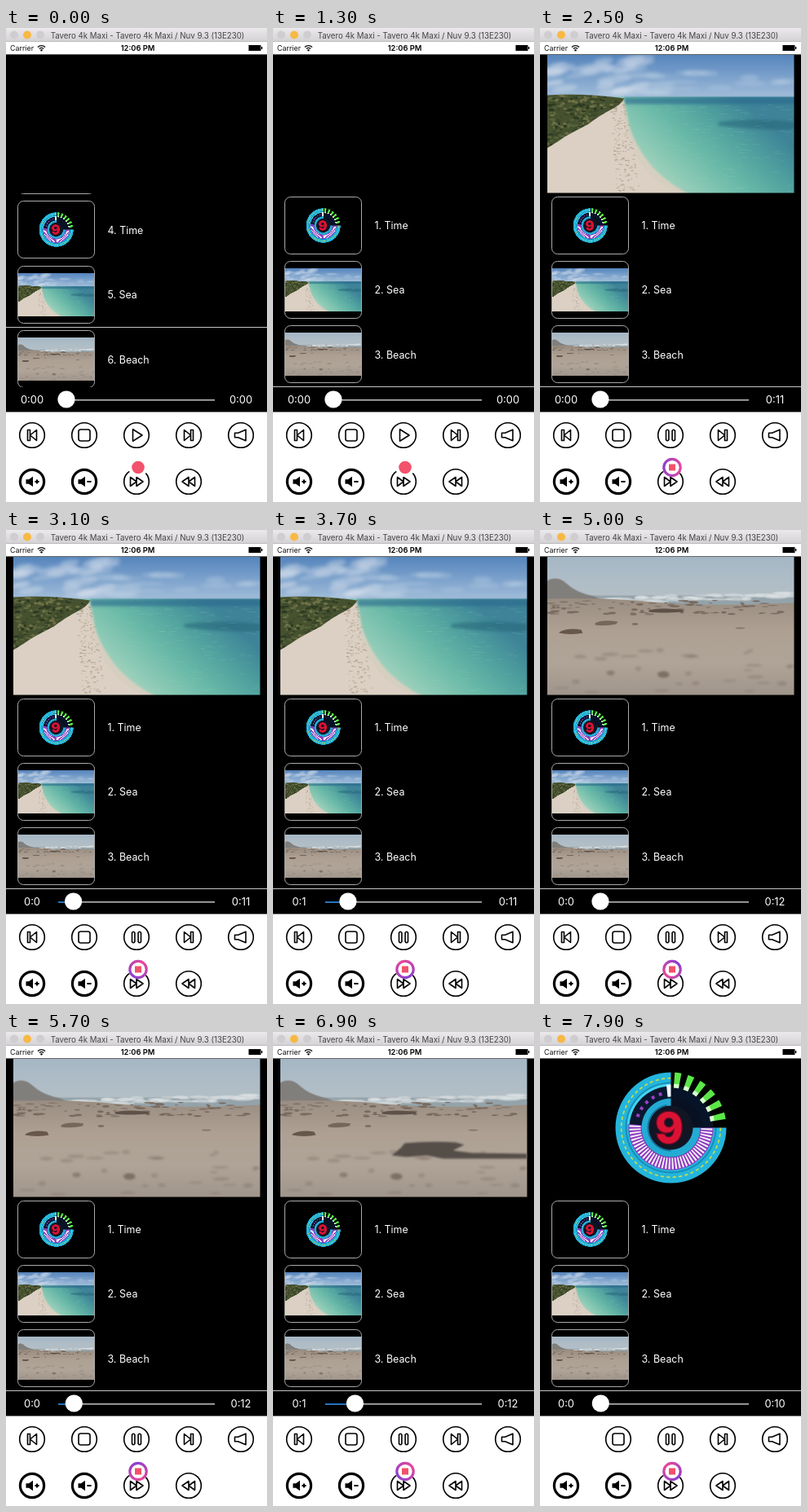
Write an HTML page with a canvas that moves like this. It is 320 px wide and 582 px high and loops after 8000 ms.

```html
<!DOCTYPE html>
<html lang="en">
<head>
<meta charset="utf-8">
<title>Video playlist</title>
<style>
html, body { margin: 0; width: 100%; height: 100%; overflow: hidden; background: #000; }
canvas { display: block; width: 320px; height: 582px; }
</style>
</head>
<body>
<canvas id="stage"></canvas>
<script>
const W = 320, H = 582, LOOP = 8000, TAU = Math.PI * 2;
const VW = 303, VH = 170;
const ratio = Math.max(1, window.devicePixelRatio || 1);
const stage = document.getElementById('stage');
stage.width = W * ratio;
stage.height = H * ratio;
const ctx = stage.getContext('2d');

function seeded(s) {
  return () => (s = (s * 16807) % 2147483647) / 2147483647;
}

function disc(g, x, y, r, fill) {
  g.beginPath();
  g.arc(x, y, r, 0, TAU);
  g.fillStyle = fill;
  g.fill();
}

function blob(g, x, y, rx, ry, fill, tilt = 0) {
  g.beginPath();
  g.ellipse(x, y, rx, ry, tilt, 0, TAU);
  g.fillStyle = fill;
  g.fill();
}

function rect(g, x, y, w, h, fill) {
  g.fillStyle = fill;
  g.fillRect(x, y, w, h);
}

function shape(g, d, fill) {
  g.fillStyle = fill;
  g.fill(new Path2D(d));
}

function gradient(g, x0, y0, x1, y1, ...colors) {
  const grad = g.createLinearGradient(x0, y0, x1, y1);
  colors.forEach((c, i) => grad.addColorStop(i / (colors.length - 1), c));
  return grad;
}

function text(str, x, y, size, color, align = 'left', weight = 400) {
  ctx.font = `${weight} ${size}px Inter, Roboto, sans-serif`;
  ctx.textAlign = align;
  ctx.textBaseline = 'alphabetic';
  ctx.fillStyle = color;
  ctx.fillText(str, x, y);
}

function scene(paint) {
  const c = document.createElement('canvas');
  c.width = VW * 2;
  c.height = VH * 2;
  const g = c.getContext('2d');
  g.scale(2, 2);
  paint(g);
  return c;
}

function paintSea(g) {
  const rnd = seeded(41);
  rect(g, 0, 0, VW, 56, gradient(g, 0, 0, 0, 54, '#5585bd', '#7ba1cc', '#a4bfda'));
  g.filter = 'blur(5px)';
  for (let i = 0; i < 22; i++) {
    blob(g, rnd() * 120, 6 + rnd() * 40, 8 + rnd() * 18, 2 + rnd() * 4, 'rgba(226,233,242,.36)', -0.15);
  }
  for (let i = 0; i < 20; i++) {
    blob(g, 100 + rnd() * 203, 22 + rnd() * 26, 10 + rnd() * 16, 1 + rnd() * 3, 'rgba(205,220,236,.3)');
  }
  g.filter = 'none';
  rect(g, 0, 52, VW, 118, gradient(g, 235, 52, 130, 170, '#3e8398', '#50a19f', '#69b9a8', '#8ccab5', '#b7d9c6'));
  g.filter = 'blur(3px)';
  rect(g, 95, 53, 215, 8, 'rgba(42,104,142,.6)');
  shape(g, 'M210 83Q250 77 303 83V92Q250 93 210 87z', 'rgba(38,100,120,.55)');
  g.filter = 'none';
  for (let i = 0; i < 130; i++) {
    const y = 60 + rnd() * 108;
    rect(g, 105 + (y - 55) * 0.6 + rnd() * 200, y, 3 + rnd() * 8, 0.6, 'rgba(165,220,204,.22)');
  }
  g.filter = 'blur(2.5px)';
  shape(g, 'M93 53Q97 65 99 78Q103 103 123 130T184 176H-6V100L70 68z', '#d6cfc0');
  g.filter = 'none';
  shape(g, 'M92 54Q93 70 95 82Q98 108 116 134T164 170H0V105L70 68z', '#dbd0c3');
  for (let i = 0; i < 180; i++) {
    const y = 60 + rnd() * 108;
    blob(g, 87 + (y - 60) * 0.12 + (rnd() - 0.5) * (10 + y * 0.12), y, 0.6 + rnd() * 1.3, 0.6, 'rgba(150,129,112,.42)');
  }
  const land = 'M0 50Q45 47 95 54Q90 62 80 67Q64 75 50 86Q34 94 22 101Q12 108 0 115z';
  shape(g, land, '#46512f');
  g.save();
  g.clip(new Path2D(land));
  for (let i = 0; i < 420; i++) {
    const y = 50 + rnd() * 68;
    blob(g, rnd() * 98, y, 1 + rnd() * 2.5, 0.6 + rnd() * 1.5,
      ['#2e3a22', '#566239', '#3a472a', '#6e7146'][i % 4]);
  }
  g.restore();
}

function paintBeach(g) {
  const rnd = seeded(97);
  rect(g, 0, 0, VW, 62, gradient(g, 0, 0, 0, 60, '#a5b7c5', '#afbdc7', '#b7c0c5'));
  g.filter = 'blur(1px)';
  rect(g, 45, 48, 258, 12, '#94a3aa');
  shape(g, 'M0 30Q10 24 20 30L30 38Q40 45 58 49L72 56H0z', '#817f7c');
  for (let i = 0; i < 45; i++) {
    const x = 70 + rnd() * 233;
    blob(g, x, 57 - x * 0.035 + rnd() * 7 - 3, 5 + rnd() * 12, 0.8 + rnd() * 1.6, 'rgba(222,227,229,.6)');
  }
  g.filter = 'none';
  shape(g, 'M0 52Q70 50 130 56T303 57V170H0z', gradient(g, 0, 52, 0, 170, '#9a8d81', '#aea194', '#b0a498', '#a1968c'));
  for (let i = 0; i < 85; i++) {
    const y = 54 + rnd() * 17;
    blob(g, rnd() * VW, y, 1.5 + rnd() * 5, 0.5 + rnd(), i % 3 ? '#786a5f' : '#85776b');
  }
  shape(g, 'M125 66Q140 62 168 66L166 68Q140 70 125 68z', '#5d5148');
  shape(g, 'M15 93Q25 87 42 90L44 94Q30 97 15 94z', '#67574a');
  shape(g, 'M59 82Q67 77 87 80L85 83Q70 86 59 84z', '#75675a');
  blob(g, 108, 83, 4, 1.5, '#7e7063');
  blob(g, 237, 88, 6, 1, '#85776a');
  g.filter = 'blur(2.5px)';
  for (let i = 0; i < 28; i++) {
    blob(g, rnd() * VW, 115 + rnd() * 52, 3 + rnd() * 8, 1 + rnd() * 2, 'rgba(115,101,90,.3)');
  }
  blob(g, 143, 145, 7, 4, '#7d7066');
  blob(g, 78, 143, 5, 3, '#8a7d73');
  g.filter = 'none';
}

function paintClock(g) {
  const cx = 152, cy = 85, R = 68, deg = Math.PI / 180;
  rect(g, 0, 0, VW, VH, '#000');
  const band = (r0, r1, a, b, color) => {
    g.beginPath();
    g.arc(cx, cy, r1, a * deg, b * deg);
    g.arc(cx, cy, r0, b * deg, a * deg, true);
    g.closePath();
    g.fillStyle = color;
    g.fill();
  };
  const ticks = (r0, r1, a, b, step, width, color) => {
    for (let k = a; k < b; k += step) band(r0, r1, k, k + width, color);
  };
  band(0, 52, 0, 360, '#081122');
  band(51, R, 0, 270, '#24b5dc');
  band(54, 56, 0, 270, '#168eb8');
  band(36, 52, 0, 185, '#8c35bd');
  ticks(37, 51, 1, 185, 5, 2.6, '#f1edf7');
  ticks(60, 61.7, 0, 270, 7, 4, '#c4dc4d');
  band(32, 51, 185, 267, '#0a1730');
  ticks(41, 45, 198, 262, 13, 5, '#9a42c8');
  band(51, 54, 185, 270, '#42d4ee');
  ticks(49, R, 274, 358, 14, 7, '#5be748');
  ticks(49, 54, 274, 358, 14, 7, '#d8ffd0');
  band(38, 49, 275, 358, '#071329');
  band(38, 53, 264, 270, '#eef7fa');
  band(26, 36, 0, 270, '#24abd3');
  band(26, 29, 90, 260, '#14749c');
  disc(g, cx, cy, 27, '#111524');
  g.font = '800 52px Inter, Roboto, sans-serif';
  g.textAlign = 'center';
  g.textBaseline = 'alphabetic';
  g.lineWidth = 3;
  g.strokeStyle = '#5b0d24';
  g.strokeText('9', cx - 2, cy + 19);
  g.fillStyle = '#dc1234';
  g.fillText('9', cx - 2, cy + 19);
}

const clips = [
  { name: 'Time', pic: scene(paintClock), secs: 10 },
  { name: 'Sea', pic: scene(paintSea), secs: 11 },
  { name: 'Beach', pic: scene(paintBeach), secs: 12 }
];
const cues = [
  { at: 2200, start: 2550, clip: 1, label: '0:00' },
  { at: 4900, start: 5050, clip: 2, label: '0:0' },
  { at: 7700, start: 7880, clip: 0, label: '0:0' }
];

const icons = {
  prev: 'M-5.5 -6.5h3v13h-3zM5.5 -6.5V6.5L-2.5 0z',
  next: 'M5.5 -6.5h-3v13h3zM-5.5 -6.5V6.5L2.5 0z',
  stop: 'M-4.5 -7h9q2.5 0 2.5 2.5v9q0 2.5 -2.5 2.5h-9q-2.5 0 -2.5 -2.5v-9q0 -2.5 2.5 -2.5z',
  play: 'M-4.5 -7.2L7 0L-4.5 7.2z',
  pause: 'M-5.5 -5.5q1.7 -2.5 3.4 0v11q-1.7 2.5 -3.4 0zM2.1 -5.5q1.7 -2.5 3.4 0v11q-1.7 2.5 -3.4 0z',
  sound: 'M-7.5 -2.8h4L6 -6.8V6.8L-3.5 2.8h-4z',
  forward: 'M-7.5 -5.5L0 0L-7.5 5.5zM0 -5.5L8 0L0 5.5z',
  rewind: 'M7.5 -5.5L0 0L7.5 5.5zM0 -5.5L-8 0L0 5.5z',
  cone: 'M-7.5 -2.8h3.5L1 -6.2V6.2L-4 2.8h-3.5z',
  plus: 'M3.4 0h5.2M6 -2.6v5.2',
  minus: 'M3.4 0h5.2'
};

function button(x, y, name) {
  const volume = name === 'plus' || name === 'minus';
  ctx.save();
  ctx.translate(x, y);
  ctx.strokeStyle = '#000';
  ctx.lineJoin = 'round';
  ctx.lineWidth = volume ? 3.2 : 1.6;
  ctx.beginPath();
  ctx.arc(0, 0, volume ? 14.6 : 15.3, 0, TAU);
  ctx.stroke();
  if (volume) shape(ctx, icons.cone, '#000');
  ctx.lineWidth = volume ? 2 : 1.6;
  ctx.stroke(new Path2D(icons[name]));
  ctx.restore();
}

function topBars() {
  rect(ctx, 0, 0, W, 17, gradient(ctx, 0, 0, 0, 17, '#ebe9eb', '#d3d1d3'));
  rect(ctx, 0, 16, W, 1, '#bdbbbd');
  disc(ctx, 10, 8.5, 5, '#cfcdcf');
  disc(ctx, 26, 8.5, 5, '#f7b944');
  disc(ctx, 42, 8.5, 5, '#cfcdcf');
  text('Tavero 4k Maxi - Tavero 4k Maxi / Nuv 9.3 (13E230)', 173.5, 12.5, 9.7, '#464446', 'center');
  rect(ctx, 0, 17, W, 15.4, '#fff');
  text('Carrier', 5, 28, 8.9, '#111');
  text('12:06 PM', 161.5, 28, 9.3, '#000', 'center', 600);
  ctx.strokeStyle = '#111';
  ctx.lineWidth = 1.4;
  for (const r of [3.6, 6.4]) {
    ctx.beginPath();
    ctx.arc(43.5, 28, r, -2.36, -0.78);
    ctx.stroke();
  }
  disc(ctx, 43.5, 27.3, 1.2, '#111');
  rect(ctx, 297.5, 21, 15, 7, '#000');
  rect(ctx, 313, 23, 1.3, 3, '#000');
}

function playlist(t) {
  const pitch = 79.3, left = 1 - Math.min(1, t / 700);
  const scroll = 232 * left * left * (3 - 2 * left);
  ctx.save();
  ctx.beginPath();
  ctx.rect(0, 203, W, 238);
  ctx.clip();
  for (let i = 0; i < 6; i++) {
    const y = 207 + i * pitch - scroll, clip = clips[i % 3];
    if (y > 445 || y < 125) continue;
    ctx.drawImage(clip.pic, 14.5, Math.floor(y) + 9, 94, 53);
    ctx.beginPath();
    ctx.roundRect(14.5, Math.floor(y) + 0.5, 94, 70, 7);
    ctx.strokeStyle = '#aaa';
    ctx.lineWidth = 1;
    ctx.stroke();
    text(`${i + 1}. ${clip.name}`, 124.5, y + 40, 12.4, '#fff');
  }
  const row = scroll > 115 ? 5 : 3;
  rect(ctx, 0, Math.round(440 + (row - 3) * pitch - scroll), W, 1, '#c4c4c4');
  ctx.restore();
}

// Dark shadow sliding in over the sand from the right.
function shadow(t) {
  const p = Math.min(1, Math.max(0, (t - 5900) / 1000));
  if (!p) return;
  ctx.save();
  ctx.translate((1 - p) * 170, 0);
  ctx.filter = 'blur(1px)';
  shape(ctx, 'M137 119L148 110L153 104Q185 101 215 103L226 106L212 113L235 116L303 117V123L200 123L180 119L155 121z', '#544d48');
  ctx.restore();
}

function video(cue, t) {
  if (!cue) return;
  const clip = clips[cue.clip];
  ctx.save();
  ctx.beginPath();
  ctx.rect(8.5, 32.5, VW, VH);
  ctx.clip();
  ctx.translate(8.5, 32.5);
  ctx.drawImage(clip.pic, 0, 0, VW, VH);
  if (cue.clip === 2) shadow(t);
  ctx.restore();
}

function controls(cue, t) {
  const clip = cue && clips[cue.clip];
  const secs = cue ? Math.max(0, t - cue.start) / 1000 : 0;
  const x = 74 + (clip ? 172 * secs / clip.secs : 0);
  const elapsed = secs ? `0:${Math.floor(secs)}` : cue ? cue.label : '0:00';
  text(elapsed, 32, 461, 12.9, '#fff', 'center');
  text(clip ? `0:${clip.secs}` : '0:00', 288, 461, 12.9, '#fff', 'center');
  rect(ctx, 64, 456, 192, 1.6, '#b7b7b7');
  rect(ctx, 64, 456, x - 64, 1.6, '#1674d1');
  disc(ctx, x, 456, 10.6, '#fff');

  rect(ctx, 0, 471.5, W, H - 471.5, '#fff');
  const names = ['prev', 'stop', cue ? 'pause' : 'play', 'next', 'sound'];
  names.forEach((name, i) => {
    if (i || !cue || cue.clip) button(32 + i * 64, 500, name);
  });
  ['plus', 'minus', 'forward', 'rewind'].forEach((name, i) => button(32 + i * 64, 557, name));
}

function recorder(t) {
  const x = 162, y = 539.5;
  disc(ctx, x, y, 11.8, '#fff');
  if (t < 1700) {
    disc(ctx, x, y, 7.8, '#f2526b');
    return;
  }
  const grad = ctx.createConicGradient(-(t - 2500) * Math.PI / 2000, x, y);
  grad.addColorStop(0, '#e8479a');
  grad.addColorStop(0.5, '#8a3fd0');
  grad.addColorStop(1, '#e8479a');
  ctx.beginPath();
  ctx.arc(x, y, 10.2, 0, TAU);
  ctx.lineWidth = 3.2;
  ctx.strokeStyle = grad;
  ctx.stroke();
  rect(ctx, x - 4, y - 4, 8, 8, '#f2526b');
}

function draw(t) {
  const cue = cues.filter(c => t >= c.at).pop();
  ctx.setTransform(ratio, 0, 0, ratio, 0, 0);
  rect(ctx, 0, 0, W, H, '#000');
  topBars();
  video(cue, t);
  playlist(t);
  controls(cue, t);
  recorder(t);
}

const begin = performance.now();
function tick() {
  draw((performance.now() - begin) % LOOP);
  requestAnimationFrame(tick);
}
tick();
</script>
</body>
</html>
```
